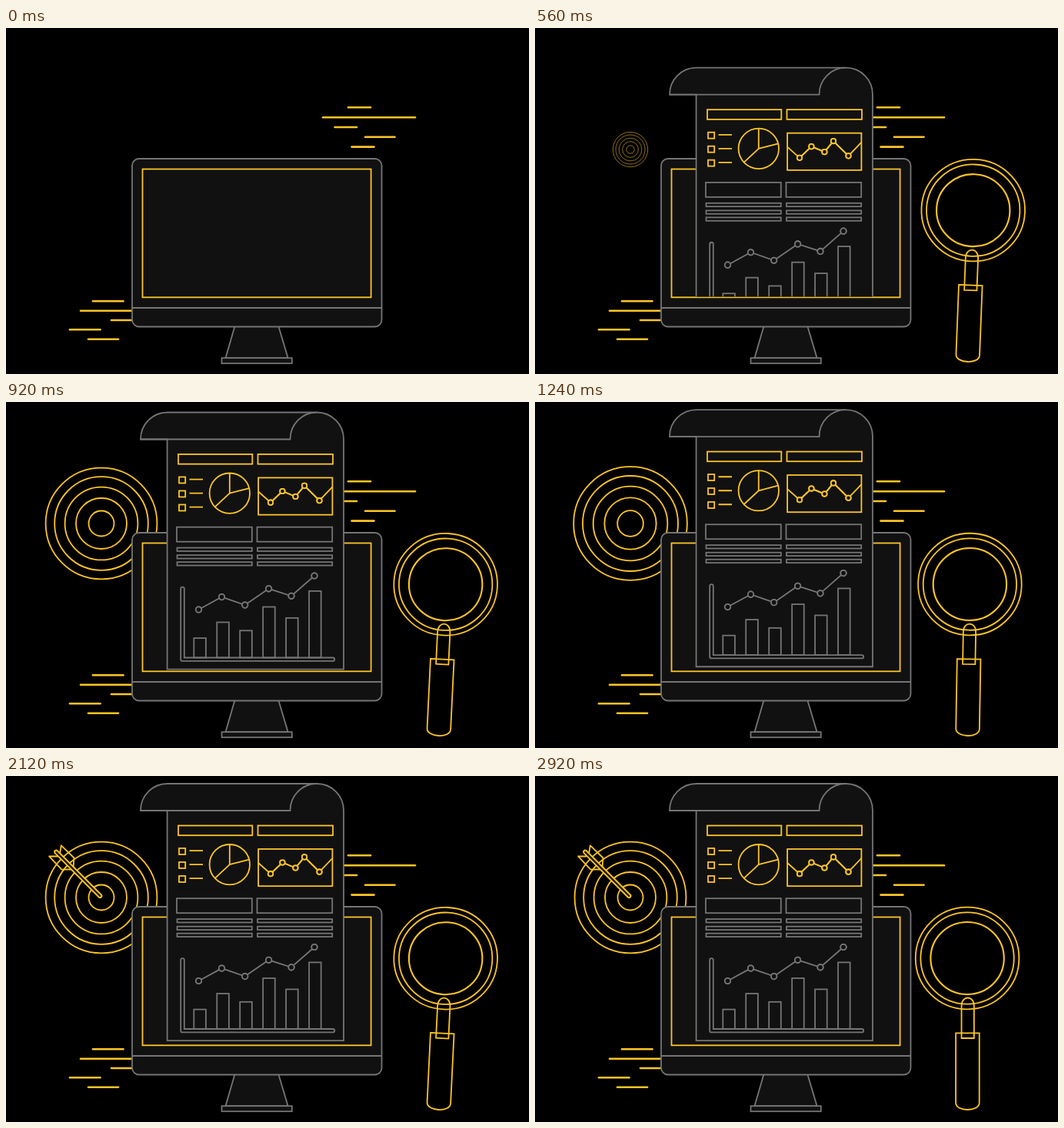
These frames come from a looping animation (680 px wide and 450 px high, 2.96 s). An HTML page with a canvas:

```html
<!DOCTYPE html>
<html lang="en">
<head>
<meta charset="utf-8">
<title>Report on screen</title>
<style>
html, body { margin: 0; width: 100%; height: 100%; overflow: hidden; background: #000; }
canvas { display: block; }
</style>
</head>
<body>
<canvas id="stage" width="680" height="450"></canvas>
<script>
const ctx = document.getElementById('stage').getContext('2d');
const YELLOW = '#fdc526', GRAY = '#757575', FILL = '#111';
const LOOP = 2960, STEP = 40;

const clamp = v => Math.max(0, Math.min(1, v));
const progress = (t, start, length) => clamp((t - start) / length);
const easeOut = (p, power) => 1 - Math.pow(1 - p, power);

function pen(color, width = 1.8) {
  ctx.strokeStyle = color;
  ctx.lineWidth = width;
}

function poly(points, closed) {
  ctx.beginPath();
  points.forEach(([x, y]) => ctx.lineTo(x, y));
  if (closed) ctx.closePath();
  ctx.stroke();
}

function box(x1, y1, x2, y2) {
  ctx.strokeRect(x1, y1, x2 - x1, y2 - y1);
}

function oval(x, y, rx, ry = rx) {
  ctx.beginPath();
  ctx.ellipse(x, y, rx, ry, 0, 0, Math.PI * 2);
  ctx.stroke();
}

// Runs a drawing inside its own saved state.
function layer(draw) {
  ctx.save();
  draw();
  ctx.restore();
}

function turn(x, y, degrees) {
  ctx.translate(x, y);
  ctx.rotate(degrees * Math.PI / 180);
  ctx.translate(-x, -y);
}

function dottedLine(points, r) {
  poly(points);
  ctx.fillStyle = FILL;
  for (const [x, y] of points) {
    oval(x, y, r);
    ctx.fill();
    ctx.stroke();
  }
}

function speedLines() {
  pen(YELLOW, 2.6);
  ctx.lineCap = 'round';
  const rows = [
    [445, 474, 103.3], [412, 532, 116.2], [427.5, 456, 129],
    [467, 505.5, 141.8], [449.5, 478.5, 154.6],
    [113, 152.5, 355.3], [97, 166, 367.7], [137, 166, 380],
    [83, 122.5, 392.3], [107, 146, 404.7]
  ];
  for (const [x1, x2, y] of rows) poly([[x1, y], [x2, y]]);
}

function target(t) {
  const grow = easeOut(progress(t, 512, 408), 3);
  if (!grow) return;
  const pulse = (1 - Math.cos(progress(t, 920, 480) * Math.PI * 2)) / 2;
  const scale = grow + 0.026 * pulse;
  ctx.translate(124, 158);
  ctx.scale(scale, scale);
  pen(YELLOW);
  for (const r of [72.4, 60.8, 47.4, 33, 16.5]) oval(0, 0, r);
}

function arrow(t) {
  const p = progress(t, 1280, 600);
  if (!p) return;
  const away = 1 - easeOut(p, 2);
  ctx.globalAlpha = clamp(p * 3);
  ctx.translate(-50 * away, -43 * away);
  const hit = t - 1800;
  if (hit > 0 && hit < 320) {
    turn(123, 157, 26 * Math.exp(-hit / 80) * Math.sin(hit / 80 * Math.PI));
  }
  pen(YELLOW);
  ctx.lineJoin = 'round';
  poly([[70, 101.5], [71.8, 90.3], [88.5, 106.5], [87.5, 119.5]]);
  poly([[67, 104.5], [56, 104.3], [72.3, 121.6], [85.5, 121.5]]);
  ctx.lineCap = 'round';
  for (const [color, width] of [[YELLOW, 6.2], ['#1c1604', 2.4]]) {
    pen(color, width);
    poly([[65.3, 98.8], [122.3, 156]]);
  }
}

function monitor() {
  pen(GRAY);
  ctx.fillStyle = FILL;
  ctx.beginPath();
  ctx.moveTo(297.3, 388.5);
  ctx.lineTo(285.5, 429.2);
  ctx.lineTo(366.6, 429.2);
  ctx.lineTo(354.5, 388.5);
  ctx.fill();
  ctx.stroke();
  ctx.fillRect(280.5, 429.2, 91.3, 7);
  box(280.5, 429.2, 371.8, 436.2);
  ctx.beginPath();
  ctx.roundRect(164, 170, 324.5, 218.5, 9);
  ctx.fill();
  ctx.stroke();
  poly([[164, 364], [488.5, 364]]);
  pen(YELLOW);
  box(177.5, 183.5, 474.6, 350.3);
}

function sheet() {
  pen(GRAY);
  ctx.fillStyle = FILL;
  ctx.beginPath();
  ctx.moveTo(175, 45);
  ctx.bezierCurveTo(175, 25.5, 190.5, 10, 210, 10);
  ctx.lineTo(404, 10);
  ctx.bezierCurveTo(423.5, 10, 439, 25.5, 439, 45);
  ctx.lineTo(439, 344.2);
  ctx.lineTo(209.6, 344.2);
  ctx.lineTo(209.6, 45);
  ctx.closePath();
  ctx.fill();
  ctx.stroke();
  ctx.beginPath();
  ctx.moveTo(175, 45);
  ctx.lineTo(369.5, 45);
  ctx.bezierCurveTo(369.5, 25.5, 385, 10, 404, 10);
  ctx.stroke();
}

function summary() {
  pen(YELLOW);
  box(224, 64.5, 320.3, 77.2);
  box(327.5, 64.5, 425, 77.2);
  for (const y of [94, 112, 130]) {
    box(225, y, 233.2, y + 8);
    poly([[238.5, y + 3.2], [256, y + 3.2]]);
  }
  oval(290.8, 115.2, 26.2);
  poly([[290.8, 89], [290.8, 115.2], [316.3, 108.6]]);
  poly([[290.8, 115.2], [271.5, 133.2]]);
  box(328.1, 95, 424.4, 143.2);
  const pts = [[344, 127.2], [359.4, 112.5], [376.4, 119.5], [388, 105.4], [407.5, 124.7]];
  poly([[328.1, 113], ...pts, [424.4, 107]]);
  dottedLine(pts, 3.2);
}

function details() {
  pen(GRAY);
  for (const [x1, x2] of [[222, 319.8], [326.5, 424.2]]) {
    box(x1, 159.2, x2, 178.2);
    for (const y of [186.1, 195.7, 204.7]) box(x1 + 0.5, y, x2, y + 4.4);
  }
  const tops = [303.6, 283, 293.8, 263, 277.4, 242.4];
  tops.forEach((top, i) => {
    const x = 244.3 + i * 29.95;
    box(x, top, x + 15.6, 329);
  });
  ctx.beginPath();
  ctx.moveTo(227.2, 239.4);
  ctx.arc(229.5, 239.4, 2.3, Math.PI, 0);
  ctx.lineTo(231.8, 329);
  ctx.lineTo(425, 329);
  ctx.arc(425, 331.2, 2.2, -Math.PI / 2, Math.PI / 2);
  ctx.lineTo(229.2, 333.4);
  ctx.quadraticCurveTo(227.2, 333.4, 227.2, 331.2);
  ctx.closePath();
  ctx.stroke();
  dottedLine([[250.5, 266.5], [280.5, 250.1], [310.7, 260.6],
    [341.6, 239.3], [371, 248.8], [401, 222.5]], 3.7);
}

function report(t) {
  const rise = easeOut(progress(t, 80, 1400), 5);
  if (!rise) return;
  ctx.beginPath();
  ctx.rect(0, 0, 680, 349.4);
  ctx.clip();
  ctx.translate(0, 340 * (1 - rise));
  sheet();
  summary();
  details();
}

function magnifier(t) {
  const shown = progress(t, 40, 360);
  if (t < 80) return;
  ctx.globalAlpha = shown;
  turn(562, 434, 1.5 * (1 - Math.cos((t - 80) / 1440 * Math.PI * 2)));
  pen(YELLOW);
  oval(562, 237, 67.3, 66.3);
  oval(562, 237, 60.7, 59.7);
  pen(YELLOW, 2.1);
  oval(562, 237, 47.7, 47);
  pen(YELLOW);
  ctx.beginPath();
  ctx.moveTo(554.5, 341);
  ctx.lineTo(554.5, 299);
  ctx.bezierCurveTo(554.5, 285, 570.8, 285, 570.8, 299);
  ctx.lineTo(570.8, 341);
  ctx.closePath();
  ctx.stroke();
  ctx.beginPath();
  ctx.moveTo(547.1, 334.4);
  ctx.lineTo(577.7, 334.4);
  ctx.lineTo(577.7, 425);
  ctx.bezierCurveTo(577.7, 437, 547.1, 437, 547.1, 425);
  ctx.closePath();
  ctx.stroke();
}

function frame(now) {
  const t = Math.floor((now % LOOP) / STEP) * STEP;
  ctx.fillStyle = '#000';
  ctx.fillRect(0, 0, 680, 450);
  for (const part of [speedLines, target, arrow, monitor, report, magnifier]) {
    layer(() => part(t));
  }
  requestAnimationFrame(frame);
}
frame(0);
</script>
</body>
</html>
```
